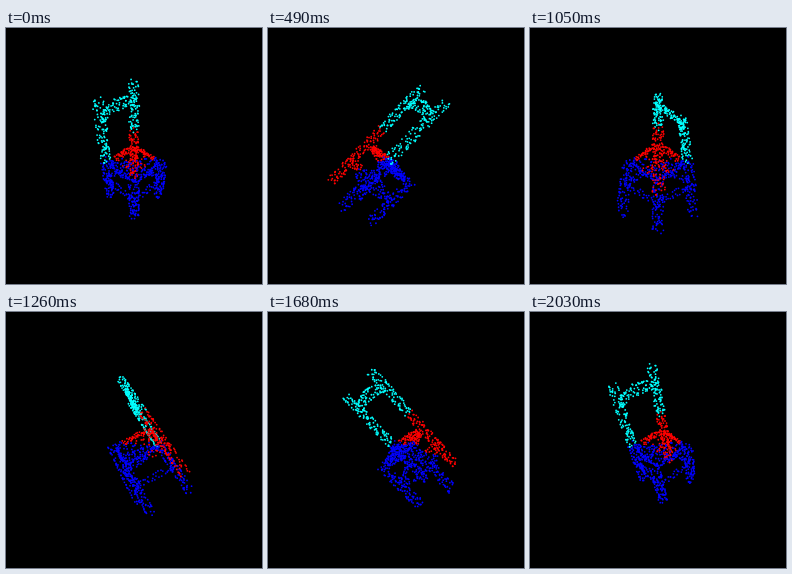
An HTML page with a canvas that plays this animation: 256x256 px, repeating every 2100 ms.

```html
<!DOCTYPE html>
<html lang="en">
<head>
<meta charset="utf-8">
<title>Turning chair</title>
<style>
  html, body { margin: 0; width: 100%; height: 100%; overflow: hidden; background: #000; }
  canvas { display: block; width: 256px; height: 256px; }
</style>
</head>
<body>
<canvas id="stage" width="256" height="256"></canvas>
<script>
const ctx = document.getElementById('stage').getContext('2d');
const CYAN = '#00ffff', RED = '#ff0000', BLUE = '#0000ff';
const LOOP = 2100, STEP = 70;
const CAMERA = 235, MID = 128;
const HALF = 20.5;             // half the side of the seat
const TOP = 66, FOOT = -66.5;  // ends of the posts and legs
const SEAT = -6, STRETCHER = -36;
const THICK = 3.7, DOT = 0.9;
const S = Math.SQRT1_2;

let seed = 20417;
function rand() {
  seed = (seed + 0x6D2B79F5) | 0;
  let n = Math.imul(seed ^ (seed >>> 15), 1 | seed);
  n = (n + Math.imul(n ^ (n >>> 7), 61 | n)) ^ n;
  return ((n ^ (n >>> 14)) >>> 0) / 4294967296;
}
const spread = (r) => (rand() * 2 - 1) * r;

// Chair axes (side u, depth v, height h) to the leaning pose in space.
const points = [];
function add(u, v, h, color) {
  const a = (u + v) * S, b = (v - u) * S;
  points.push({ x: a, y: (h - b) * S, z: (h + b) * S, color });
}

// Random place on the outline of a box's cross-section.
function rim(rx, ry) {
  const side = rand() < 0.5 ? -1 : 1;
  return rand() < ry / (rx + ry) ? [side * rx, spread(ry)] : [spread(rx), side * ry];
}

function post(u, v, low, high, count, paint) {
  for (let i = 0; i < count; i++) {
    const h = low + (high - low) * (i + rand()) / count;
    const [du, dv] = rim(THICK, THICK);
    add(u * HALF + du, v * HALF + dv, h, paint(h));
  }
}

function bar(from, to, h, rx, ry, count, paint) {
  const across = from[0] === to[0];
  for (let i = 0; i < count; i++) {
    const k = (i + rand()) / count;
    const [side, dh] = rim(rx, ry);
    const u = (from[0] + (to[0] - from[0]) * k) * HALF;
    const v = (from[1] + (to[1] - from[1]) * k) * HALF;
    add(u + (across ? side : 0), v + (across ? 0 : side), h + dh, paint(k));
  }
}

function backRest(count) {
  for (let i = 0; i < count; i++) {
    const k = (i + rand()) / count;
    const arch = Math.sin(Math.PI * k);
    const rise = rand() < 0.5 ? rand() : Math.round(rand());
    add(HALF * (1 - 2 * k), -HALF + spread(2.2), 42 + 3 * arch + rise * (6 + 5 * arch), CYAN);
  }
}

// Rounded square plate, with more points along its edge.
function seat(count) {
  for (let i = 0; i < count; i++) {
    const angle = 2 * Math.PI * (i + rand()) / count;
    const c = Math.cos(angle), s = Math.sin(angle);
    const edge = HALF / Math.pow(c ** 4 + s ** 4, 0.25);
    const onRim = rand() < 0.55;
    const r = edge * (onRim ? 1 - 0.1 * rand() : Math.sqrt(rand()));
    const u = r * c, v = r * s;
    add(u, v, -10.5 + spread(3.5), (v - u) * S < -6 ? RED : BLUE);
  }
}

const A = [1, -1], B = [-1, -1], C = [-1, 1], D = [1, 1];
const blue = () => BLUE;

post(...A, FOOT, TOP, 200, (h) => h > 9 ? CYAN : RED);
post(...B, FOOT, TOP, 200, (h) => h > SEAT ? CYAN : BLUE);
post(...C, FOOT, SEAT, 92, blue);
post(...D, FOOT, SEAT, 92, blue);
backRest(80);
seat(270);

for (const end of [B, D]) {
  bar(A, end, STRETCHER, 2, 2.5, 28, (k) => k < 0.42 ? RED : BLUE);
  bar(C, end, STRETCHER, 2, 2.5, 28, blue);
}

function draw(angle) {
  const c = Math.cos(angle), s = Math.sin(angle);
  const seen = points.map((p) => {
    const z = p.z * c - p.x * s;
    const scale = CAMERA / (CAMERA - z);
    return {
      x: MID + (p.x * c + p.z * s) * scale,
      y: MID - p.y * scale,
      z,
      color: p.color
    };
  }).sort((p, q) => p.z - q.z);

  ctx.fillStyle = '#000';
  ctx.fillRect(0, 0, 256, 256);
  for (const p of seen) {
    ctx.fillStyle = p.color;
    ctx.beginPath();
    ctx.arc(p.x, p.y, DOT, 0, 2 * Math.PI);
    ctx.fill();
  }
}

const start = performance.now();
let shown = -1;
function tick() {
  const t = Math.max(0, performance.now() - start) % LOOP;
  const step = Math.floor(t / STEP);
  if (step !== shown) {
    shown = step;
    draw(2 * Math.PI * step * STEP / LOOP);
  }
  requestAnimationFrame(tick);
}
tick();
</script>
</body>
</html>
```
